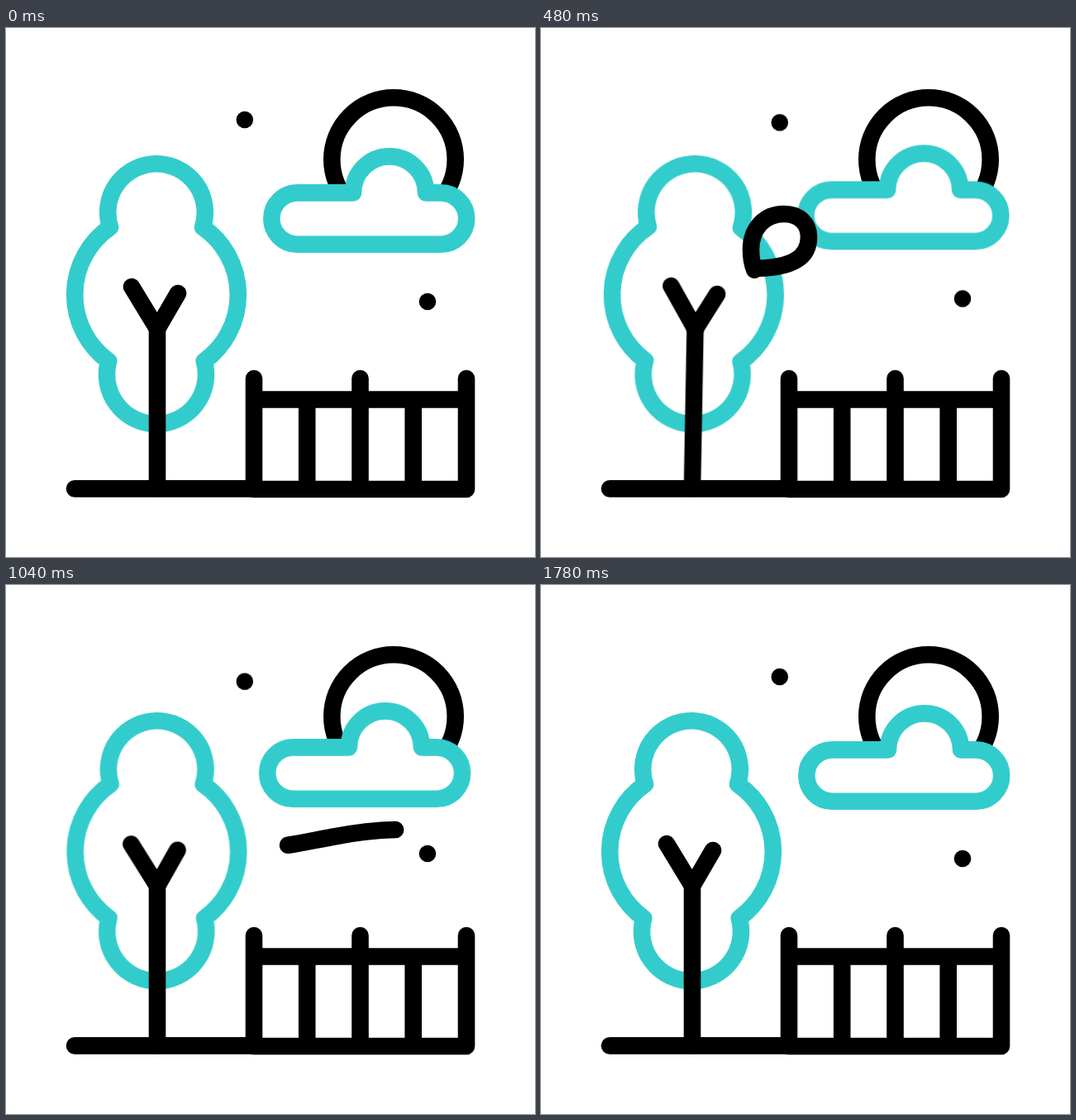
An HTML page without scripts that plays this animation: 640x640 px, repeating every 1800 ms.

```html
<!DOCTYPE html>
<html lang="en">
<head>
<meta charset="utf-8">
<title>Windy park</title>
<style>
  html, body { margin: 0; width: 100%; height: 100%; overflow: hidden; background: #fff; }
  svg { display: block; width: 100%; height: 100%; }
  .line { fill: none; stroke: #000; stroke-width: 20.6; stroke-linecap: round; stroke-linejoin: round; }
  .teal { stroke: #3cc; }

  .move { animation: 1800ms cubic-bezier(.37, 0, .63, 1) infinite; }
  .dot-a { animation-name: dot-a; }
  .dot-b { animation-name: dot-b; }
  .cloud-x { animation-name: cloud-x; }
  .cloud-y { animation-name: cloud-y; }
  .crown { animation-name: crown; transform-origin: 183px 550px; }
  .trunk { animation-name: trunk; transform-origin: 183px 557px; }
  .twigs { animation-name: twigs; transform-origin: 183px 364px; }
  .wind { animation: wind 1800ms linear infinite; }

  @keyframes dot-a { 50% { transform: translateY(6px); } }
  @keyframes dot-b { 50% { transform: translateY(-6.5px); } }

  @keyframes cloud-x {
    0%, 13.9% { transform: translateX(0); }
    62.5% { transform: translateX(-5.3px); }
    100% { transform: translateX(0); }
  }
  @keyframes cloud-y {
    0% { transform: translateY(0); }
    41% { transform: translateY(-5px); }
    79%, 100% { transform: translateY(0); }
  }

  @keyframes crown {
    0% { transform: rotate(0); }
    35.5% { transform: rotate(.84deg); }
    44.4% { transform: rotate(0); }
    56% { transform: rotate(.13deg); }
    68%, 100% { transform: rotate(0); }
  }
  @keyframes trunk {
    0% { transform: rotate(0); }
    31.1% { transform: rotate(1.1deg); }
    44.4%, 100% { transform: rotate(0); }
  }
  @keyframes twigs {
    0% { transform: rotate(0); }
    20% { transform: rotate(2.1deg); }
    33.3%, 44.4% { transform: rotate(0); }
    57% { transform: rotate(-.7deg); }
    66%, 100% { transform: rotate(0); }
  }

  /* dash length = visible stroke, offset = its tail */
  @keyframes wind {
    0%, 4.43% { opacity: 0; stroke-dasharray: 0 999; stroke-dashoffset: 0; }
    4.44% { opacity: 1; stroke-dasharray: 0 999; stroke-dashoffset: 0; }
    11.11% { stroke-dasharray: 55 999; stroke-dashoffset: 0; }
    20% { stroke-dasharray: 154 999; stroke-dashoffset: 0; }
    26.67% { stroke-dasharray: 219 999; stroke-dashoffset: -26; }
    33.33% { stroke-dasharray: 248 999; stroke-dashoffset: -72; }
    38.89% { stroke-dasharray: 226 999; stroke-dashoffset: -128; }
    44.44% { stroke-dasharray: 194 999; stroke-dashoffset: -194; }
    57.78% { stroke-dasharray: 132 999; stroke-dashoffset: -338; }
    62.22% { stroke-dasharray: 107 999; stroke-dashoffset: -383; }
    66.67% { stroke-dasharray: 65 999; stroke-dashoffset: -425; }
    72.22% { stroke-dasharray: 26 999; stroke-dashoffset: -464; }
    76.66% { opacity: 1; stroke-dasharray: 1 999; stroke-dashoffset: -488; }
    76.67%, 100% { opacity: 0; stroke-dasharray: 0 999; stroke-dashoffset: -489; }
  }
</style>
</head>
<body>
<svg viewBox="0 0 640 640">
  <circle class="line" cx="469" cy="159" r="74.7"/>
  <g class="move cloud-x">
    <path class="line teal move cloud-y" style="fill:#fff" d="M352.5 199.4H420A44 44 0 0 1 508 199.4H526A31.2 31.2 0 0 1 526 261.8H352.5A31.2 31.2 0 0 1 352.5 199.4Z"/>
  </g>

  <path class="line teal move crown" d="M126 241A58.8 58.8 0 1 1 238 241A99.2 99.2 0 0 1 239.8 403A60 60 0 1 1 124.2 403A99.2 99.2 0 0 1 126 241Z"/>

  <g class="move trunk">
    <path class="line" d="M183 557V364"/>
    <path class="line move twigs" d="M152 313L183 364L208 321"/>
  </g>

  <g class="line">
    <path d="M83 557.4H300"/>
    <path d="M300 424V558H557V424M428.5 424V558M300 449.5H557M364.2 449.5V558M492.7 449.5V558"/>
  </g>

  <circle class="move dot-a" cx="288.8" cy="111" r="10.3"/>
  <circle class="move dot-b" cx="510" cy="331" r="10.3"/>

  <path class="line wind" d="M235 290C292 294 324 284 324 253C324 236 312 225 294 225C270 225 254 243 254 268C254 300 270 318 303 318C334 318 366 310 394 305C430 298 452 296 476 296H495"/>
</svg>
</body>
</html>
```
